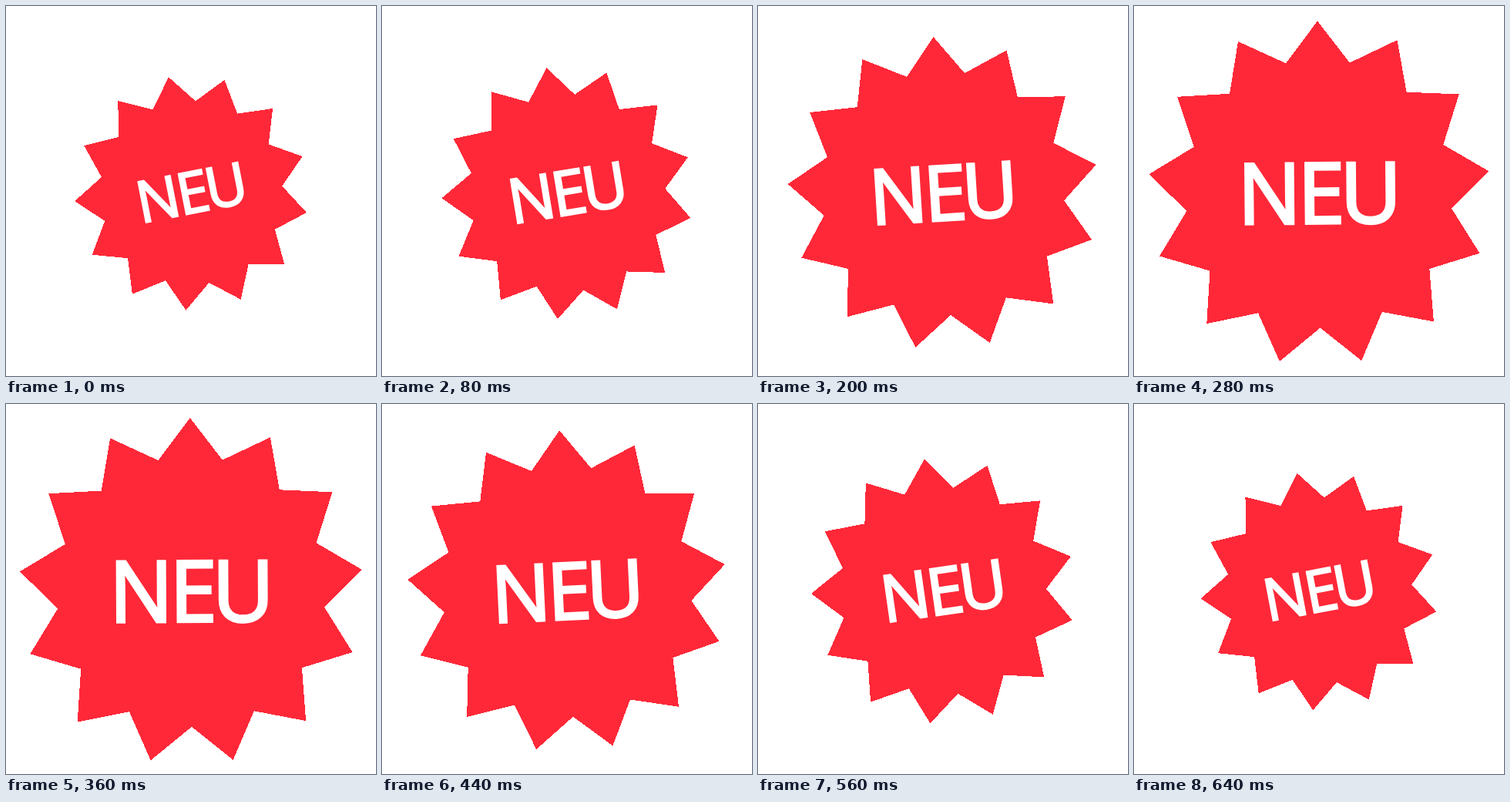
Animation, 480 px wide and 480 px high, one loop 0.68 s. Source, as an HTML page:

```html
<!DOCTYPE html>
<html lang="de">
<head>
<meta charset="utf-8">
<title>NEU</title>
<style>
  html, body { margin: 0; width: 100%; height: 100%; overflow: hidden; background: #fff; }
  svg { display: block; width: 100%; height: 100%; }
  text {
    font-family: "Open Sans", "Noto Sans", sans-serif;
    font-size: 111.2px;
    font-weight: 400;
    text-anchor: middle;
    fill: #fff;
    stroke: #fff;
    stroke-width: 3.6px;
  }
</style>
</head>
<body>
<svg viewBox="0 0 480 480">
  <g id="badge">
    <polygon id="star" fill="#ff2838" shape-rendering="crispEdges"/>
    <text x="-65.3 2.9 68.2" y="42.7">NEU</text>
  </g>
</svg>
<script>
  const LOOP = 680, STEP = 40;
  const POINTS = 13, RX = 225.6, RY = 227.3, CY = 3.3, INNER = 0.779;
  const MIN = 0.672, TILT = 33.9;

  // [time in ms, phase of the pulse in degrees]
  const keys = [[0, 0], [80, 46.2], [200, 110.8], [360, 199],
                [480, 259.6], [560, 297.7], [640, 338.9], [680, 360]];

  const badge = document.getElementById('badge');

  function starPoints() {
    return Array.from({ length: POINTS * 2 }, (_, i) => {
      const a = i * Math.PI / POINTS;
      const k = i % 2 ? INNER : 1;
      const x = RX * k * Math.sin(a);
      const y = CY - RY * k * Math.cos(a);
      return x.toFixed(2) + ',' + y.toFixed(2);
    }).join(' ');
  }

  function phaseAt(t) {
    const i = keys.findIndex(k => k[0] > t);
    const [t0, p0] = keys[i - 1], [t1, p1] = keys[i];
    return p0 + (p1 - p0) * (t - t0) / (t1 - t0);
  }

  function draw(ms) {
    const t = Math.floor((ms % LOOP) / STEP) * STEP;
    const pulse = (1 - Math.cos(phaseAt(t) * Math.PI / 180)) / 2;
    const scale = MIN + (1 - MIN) * pulse;
    const angle = (scale - 1) * TILT;
    badge.setAttribute('transform', `translate(240 240) rotate(${angle}) scale(${scale})`);
  }

  document.getElementById('star').setAttribute('points', starPoints());
  const start = performance.now();
  function tick() {
    draw(performance.now() - start);
    requestAnimationFrame(tick);
  }
  tick();
</script>
</body>
</html>
```
